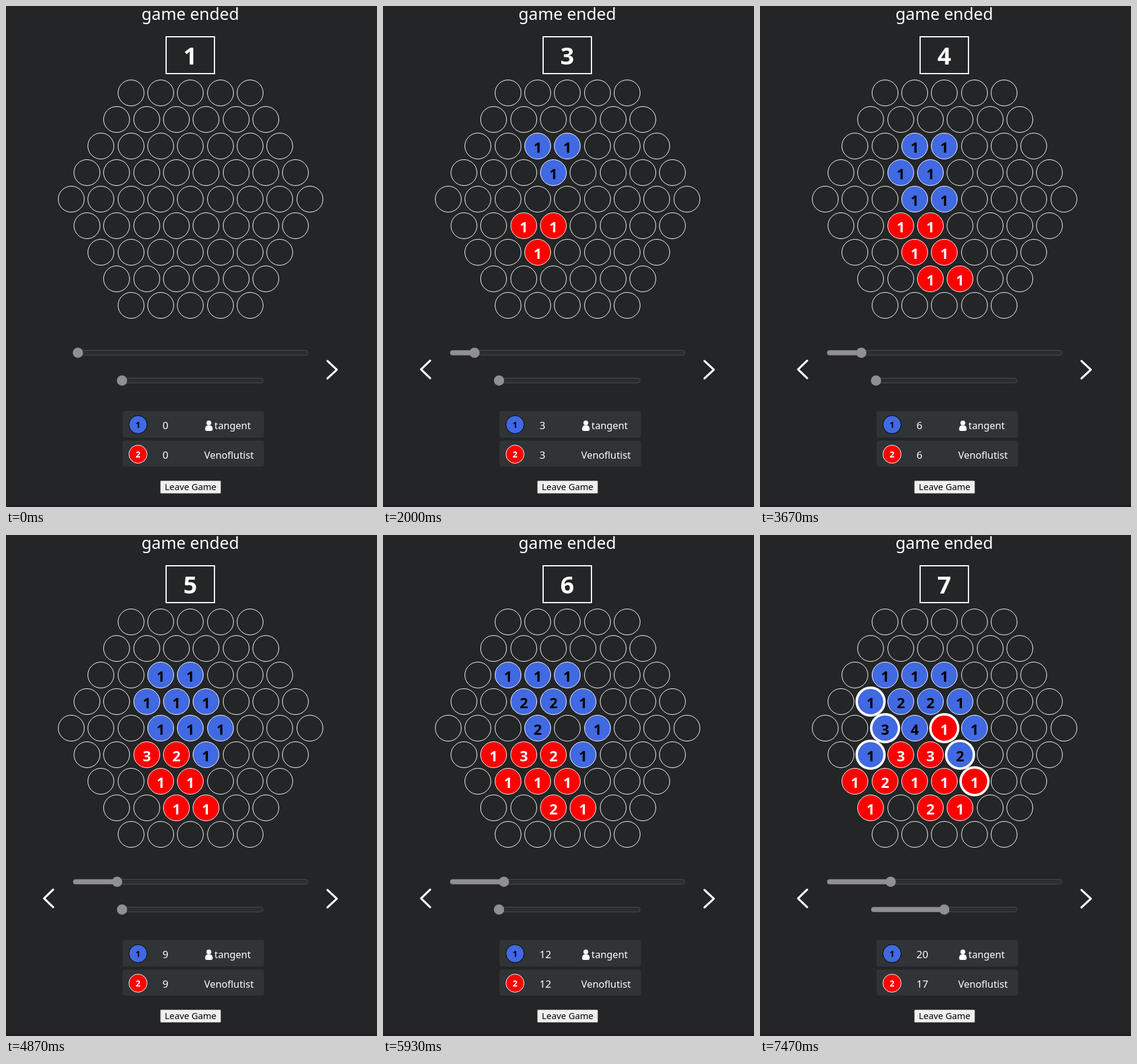
An HTML page for the animation above (8 s loop, 614 by 830 pixels).

```html
<!DOCTYPE html>
<html lang="en">
<head>
<meta charset="utf-8">
<title>Hex board replay</title>
<style>
  html, body { margin: 0; width: 100%; height: 100%; overflow: hidden; background: #242527; }
  svg { display: block; width: 614px; height: 830px; font-family: "Noto Sans", "Open Sans", sans-serif; fill: #fff; }
  .mid { text-anchor: middle; }
  .bold { font-weight: 700; }
  .cell { fill: none; stroke: #fff; stroke-width: 1; }
  .cell.hot { stroke-width: 4; }
  .blue { fill: #4169e1; }
  .red { fill: #f00; }
  .chevron { fill: none; stroke: #fff; stroke-width: 3.4; stroke-linecap: round; stroke-linejoin: round; }
  .track { fill: #2c2d2f; stroke: #4c4d4f; }
  .gray { fill: #909092; }
  .row { fill: #303436; }
</style>
</head>
<body>
<svg id="stage" viewBox="0 0 614 830"></svg>
<script>
const LOOP = 8000;
const TURNS = 24;

// start ms, turn, inner slider position, moves (player, row, column)
const STEPS = [
  [0, 1, 0, ''],
  [330, 1, 1, 'b23 r52'],
  [870, 2, 0, ''],
  [1330, 2, 1, 'b22 b33 r53 r62'],
  [2000, 3, 0, ''],
  [2530, 3, 0.5, 'b32 b43 b44 r63 r72'],
  [3130, 3, 1, 'r73'],
  [3670, 4, 0, ''],
  [4270, 4, 1, 'b34 b45 b54 r52 r52 r53'],
  [4870, 5, 0, ''],
  [5400, 5, 1, 'b21 b32 b33 b43 r44 r51 r61 r72'],
  [5930, 6, 0, ''],
  [6470, 6, 1, 'b42 b42 b43 b43 b44 r51 r53 r60 r61 r70'],
  [7000, 7, 0, ''],
  [7470, 7, 0.5, 'b31 b42 b51 b51 b51 b54 r44 r44 r64']
];

const stage = document.getElementById('stage');

function add(tag, attrs, text = '') {
  const el = document.createElementNS('http://www.w3.org/2000/svg', tag);
  for (const key in attrs) el.setAttribute(key, attrs[key]);
  el.textContent = text;
  stage.append(el);
  return el;
}

const label = (x, y, size, text, cls = '', fill = '#fff') =>
  add('text', { x, y, 'font-size': size, class: cls, fill }, text);

function makeSlider(x, y, width) {
  add('rect', { x: x + 0.5, y: y - 4, width: width - 1, height: 8, rx: 4, class: 'track' });
  const bar = add('rect', { x, y: y - 4, height: 8, rx: 4, class: 'gray' });
  const thumb = add('circle', { cy: y, r: 8.5, class: 'gray' });
  return part => {
    const pos = x + 8 + part * (width - 16);
    bar.setAttribute('width', pos - x);
    thumb.setAttribute('cx', pos);
  };
}

function makePlayer(y, height, number, color, ink, name, nameX) {
  const mid = y + 23;
  add('rect', { x: 193, y, width: 234, height, rx: 4, class: 'row' });
  add('circle', { cx: 218.5, cy: mid - 0.5, r: 15, class: color, stroke: ink });
  label(218.5, mid + 5, 14, number, 'mid bold', ink);
  label(nameX, mid + 7, 16.3, name);
  return label(259, mid + 7, 17, '0');
}

function makeBoard() {
  const cells = {};
  for (let row = 0; row < 9; row++) {
    const count = 9 - Math.abs(row - 4);
    const center = row % 2 ? 306.7 : 305.4;
    for (let col = 0; col < count; col++) {
      const cx = Math.round(center + (col - (count - 1) / 2) * 49.33);
      const cy = 144 + row * 44;
      cells['' + row + col] = {
        disc: add('circle', { cx, cy, r: 21.5, class: 'cell' }),
        digit: label(cx, cy + 10.5, 24, '', 'mid bold')
      };
    }
  }
  return cells;
}

add('rect', { x: 0, y: 826, width: 614, height: 4, fill: '#1f1f24' });
label(305, 23, 27.3, 'game ended', 'mid');
add('rect', { x: 265, y: 51, width: 80, height: 61, fill: 'none', stroke: '#fff', 'stroke-width': 2 });
const turnLabel = label(305, 97, 40, '1', 'mid bold');
const cells = makeBoard();
const setTurn = makeSlider(111, 574.5, 389);
const setInner = makeSlider(184, 620.5, 242);
const back = add('path', { d: 'M78 587.5 63 602 78 616.5', class: 'chevron' });
add('path', { d: 'M532 588 547.5 602.5 532 617', class: 'chevron' });
const blueScore = makePlayer(671, 44, '1', 'blue', '#000', 'tangent', 345);
const redScore = makePlayer(720, 43, '2', 'red', '#fff', 'Venoflutist', 328);
add('circle', { cx: 335.7, cy: 690.7, r: 4 });
add('path', { d: 'M332.5 695h6.5q3 1.5 3 6 0 3-3 3h-6.5q-3 0-3-3 0-4.500 3-6Z' });
add('rect', { x: 255.5, y: 786.5, width: 100, height: 21, rx: 1.5, fill: '#efefef', stroke: '#767676' });
label(305.5, 802, 14.8, 'Leave Game', 'mid', '#000');

// Opposing moves on one cell cancel out: positive is blue, negative red.
function boardAt(index) {
  const board = {};
  for (const step of STEPS.slice(0, index + 1)) {
    for (const [who, row, col] of step[3].split(' ').filter(Boolean)) {
      const key = row + col;
      board[key] = (board[key] || 0) + (who === 'b' ? 1 : -1);
    }
  }
  return board;
}

function show(index) {
  const [, turn, inner, moves] = STEPS[index];
  const board = boardAt(index);
  let blue = 0, red = 0;
  for (const key in cells) {
    const value = board[key] || 0;
    const hot = moves.includes(key);
    const { disc, digit } = cells[key];
    disc.setAttribute('class', 'cell' + (hot ? ' hot' : '') + (value > 0 ? ' blue' : value < 0 ? ' red' : ''));
    disc.setAttribute('r', hot ? 23 : 21.5);
    digit.textContent = value ? Math.abs(value) : '';
    digit.setAttribute('fill', value > 0 ? '#000' : '#fff');
    blue += Math.max(value, 0);
    red += Math.max(-value, 0);
  }
  turnLabel.textContent = turn;
  blueScore.textContent = blue;
  redScore.textContent = red;
  setTurn((turn - 1) / (TURNS - 1));
  setInner(inner);
  back.style.display = index ? '' : 'none';
}

let shown = -1;
function tick() {
  const time = performance.now() % LOOP;
  const index = STEPS.filter(step => step[0] <= time).length - 1;
  if (index !== shown) show(shown = index);
  requestAnimationFrame(tick);
}
tick();
</script>
</body>
</html>
```
